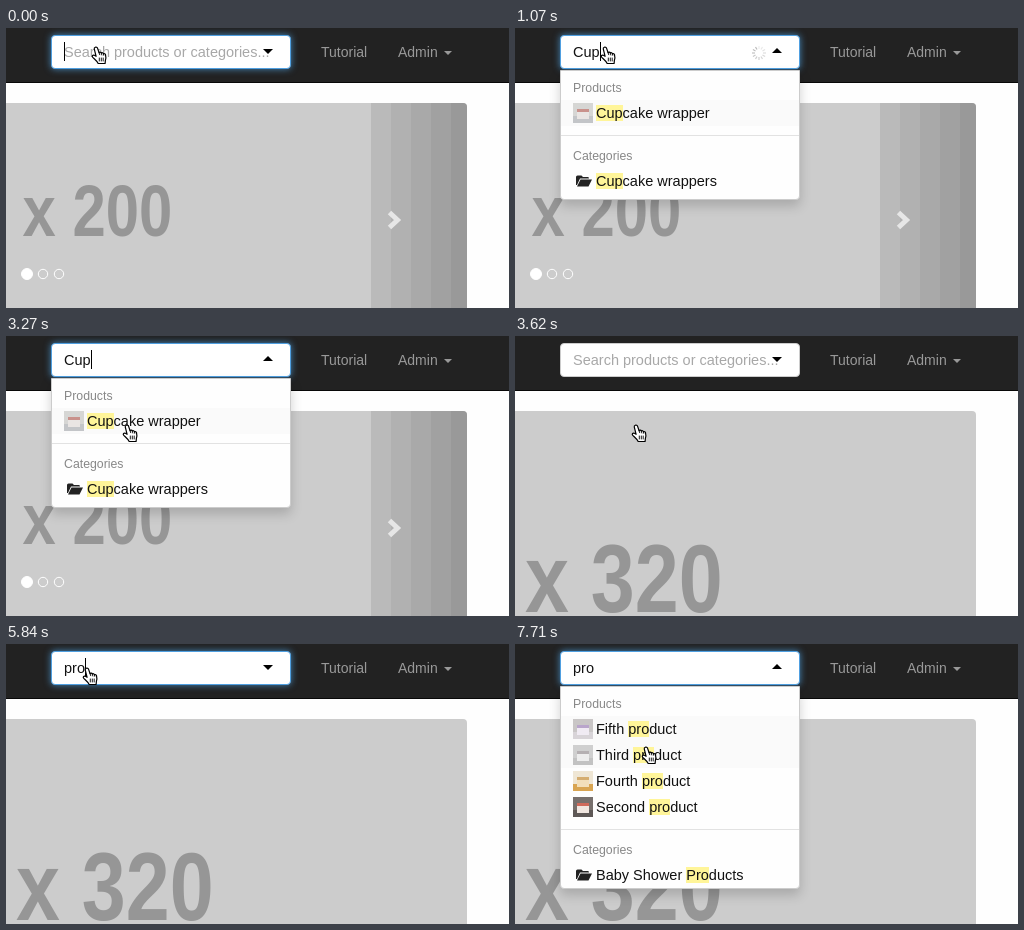
Animation of 503x280 px, one loop 8 s. Source, as an HTML page:

```html
<!DOCTYPE html>
<html lang="en">
<head>
<meta charset="utf-8">
<title>Product search</title>
<style>
  html, body { margin: 0; width: 100%; height: 100%; overflow: hidden; background: #fefefe; }
  body { position: relative; font: 14.5px/26px "Liberation Sans", Arial, sans-serif; color: #111; }
  body * { position: absolute; left: 0; top: 0; box-sizing: border-box; white-space: nowrap; }
  svg { overflow: visible; }
  svg * { position: static; }
  .stage { width: 503px; height: 280px; overflow: hidden; }
  .nav { width: 503px; height: 55px; background: #222; border-bottom: 1px solid #080808; }
  .link { top: 11px; font-size: 14px; color: #999; }
  .search { left: 45px; top: 7px; width: 240px; height: 34px; background: #fff; border: 1px solid #ccc; border-radius: 4px; }
  .search.focus { border-color: #4f9fe0; box-shadow: 0 0 7px rgba(82, 168, 236, .75); }
  #query { left: 58px; top: 11px; }
  #query.empty { color: #a8a8a8; }
  #caret { top: 14px; width: 1px; height: 19px; background: #000; }
  .menu { left: 45px; top: 42px; width: 240px; background: #fefefe; border: 1px solid #ccc; border-radius: 0 0 4px 4px;
          box-shadow: 0 6px 12px rgba(0, 0, 0, .175); overflow: hidden; }
  .head { left: 12px; font-size: 12.3px; color: #888; }
  .row { width: 238px; height: 26px; padding-left: 35px; }
  .row.active { background: #fafafa; }
  .row mark { position: static; background: #fff599; color: inherit; }
  .row svg { left: 12px; top: 3px; }
  .rule { width: 238px; height: 1px; background: #e2e2e2; }
  .lettering { font: bold 73px "Liberation Sans", Arial, sans-serif; fill: #969696; }
</style>
</head>
<body>
<div class="stage">
  <svg width="503" height="280">
    <rect x="-10" y="75" width="471" height="230" rx="4" fill="#ccc"/>
    <g id="slide1">
      <g id="bands"></g>
      <text class="lettering" transform="translate(16.500 208) scale(.82 1)">x 200</text>
      <path d="M383.500 184.500l8 7.500-8 7.500" fill="none" stroke="#e6e6e6" stroke-width="5"/>
      <g fill="none" stroke="#fff">
        <circle cx="21" cy="246" r="5.500" fill="#fff"/>
        <circle cx="37" cy="246" r="4.700"/>
        <circle cx="53" cy="246" r="4.700"/>
      </g>
    </g>
    <text id="slide2" class="lettering" transform="translate(10 276) scale(1.082 1.320)">x 320</text>
  </svg>

  <div class="nav"></div>
  <span class="link" style="left:315px">Tutorial</span>
  <span class="link" style="left:392px">Admin</span>
  <div class="search" id="search"></div>
  <span id="query"></span>
  <div id="caret"></div>
  <svg width="503" height="55">
    <path d="M438 23h8l-4 4z" fill="#999"/>
    <path id="arrow"/>
    <g id="spinner" stroke="#888" stroke-width="1.200"></g>
  </svg>
  <div id="menus"></div>
  <svg id="hand" width="16" height="19" stroke="#000" stroke-linejoin="round" stroke-linecap="round">
    <path fill="#fff" stroke-width="1.200" d="M4.200 1.300c1-.6 2 0 2.400 1.100l1.500 4.300c.6-.8 1.800-.7 2.200.3.700-.6 1.800-.3 2.100.7.900-.4 1.900.1 2.100 1 .5 2 .6 3.600-.1 5.500l-.3 3.300H7.200C6.300 15.200 3.700 13.300 1.600 11.200c-1-1.200.4-2.700 1.800-1.900l1.700 1L3.300 3.200C3.100 2.400 3.500 1.600 4.200 1.300z"/>
    <path fill="none" stroke-width=".9" d="M8.100 6.700l.6 2M10.300 7l.5 2M12.400 7.700l.3 1.600M8.300 12v3M10.300 12v3M12.200 12v3"/>
  </svg>
</div>

<script>
const LOOP = 8000;
const $ = id => document.getElementById(id);
const rect = (x, y, w, h, fill) => `<rect x="${x}" y="${y}" width="${w}" height="${h}" fill="${fill}"/>`;

$("bands").innerHTML = ["#bababa", "#b1b1b1", "#a9a9a9", "#a1a1a1"]
  .map((fill, i) => rect(365 + 20 * i, 75, 21, 205, fill)).join("") +
  '<path d="M445 75h12q4 0 4 4v201h-16z" fill="#999"/>';

$("spinner").innerHTML = Array.from({ length: 12 }, (_, i) =>
  `<path d="M244 21v-3" opacity="${0.15 + i * 0.04}" transform="rotate(${i * 30} 244 25)"/>`).join("");

// Thumbnail: backdrop, table, item and its trim.
const thumb = (back, table, item, trim) => `<svg width="20" height="20">${
  rect(0, 0, 20, 20, back) + rect(0, 13, 20, 7, table) + rect(4, 7, 12, 9, item) + rect(4, 6, 12, 3, trim)}</svg>`;
const folder = `<svg width="20" height="20"><path fill="#222" d="M3 14V6q0-1.500 1.500-1.500h4L10 6h5q1 0 1 1.500H7L4 14z"/>
  <path fill="#222" d="M7.500 8.500H19L15.500 15.500H4z"/></svg>`;

const row = (y, icon, label, active) =>
  `<div class="row${active ? " active" : ""}" style="top:${y}px">${icon}${label.replace(/\[(.*)\]/, "<mark>$1</mark>")}</div>`;

function addMenu(products, category, height) {
  const end = 29 + 26 * products.length;
  const menu = document.createElement("div");
  menu.className = "menu";
  menu.style.height = height + "px";
  menu.innerHTML = '<div class="head" style="top:4px">Products</div>' +
    products.map(([label, ...colors], i) => row(29 + 26 * i, thumb(...colors), label, i === 0)).join("") +
    `<div class="rule" style="top:${end + 9}px"></div>
     <div class="head" style="top:${end + 17}px">Categories</div>` +
    row(end + 42, folder, category);
  $("menus").append(menu);
  return menu;
}

const cupMenu = addMenu([["[Cup]cake wrapper", "#d6d6d4", "#c3c5c8", "#e9e5e3", "#c9928c"]], "[Cup]cake wrappers", 130);
const proMenu = addMenu([
  ["Fifth [pro]duct", "#c9c6c6", "#d8d4d8", "#f0ebf3", "#b9a5cb"],
  ["Third [pro]duct", "#cfcfcf", "#c2c2c2", "#ededed", "#b5b0b2"],
  ["Fourth [pro]duct", "#efe6d4", "#d9a552", "#f3dfba", "#d5ad70"],
  ["Second [pro]duct", "#77706d", "#5e5856", "#f0e6e0", "#cf6a5b"],
], "Baby Shower [Pro]ducts", 203);
const secondRow = proMenu.querySelectorAll(".row")[1];

const typing = [[0, ""], [270, "C"], [450, "Cu"], [620, "Cup"], [3350, "Cupcake wrapper"], [3620, ""],
  [5580, "p"], [5670, "pr"], [5840, "pro"]];
const caretOn = [[0, 1510], [2020, 2560], [3100, 3350], [4680, 5220], [5580, 6730], [7270, 7710]];

// Pointer moves: start, end, steps, destination.
const moves = [[1420, 2020, 8, 121, 87], [2380, 2740, 5, 121, 146], [2820, 3180, 5, 116, 88],
  [4160, 4510, 5, 76, 23], [7180, 7710, 7, 126, 102]];

const within = (t, from, to) => t >= from && t < to;
const show = (el, on) => { el.style.display = on ? "" : "none"; };

function pointerAt(t) {
  let x = 85, y = 18;
  for (const [start, end, steps, toX, toY] of moves) {
    if (t < start) break;
    const step = Math.floor((t - start) / (end - start) * (steps - 1) + 1e-6) + 1;
    const p = Math.min(1, step / steps);
    const eased = p * p * (3 - 2 * p);
    x += (toX - x) * eased;
    y += (toY - y) * eased;
  }
  return [Math.round(x), Math.round(y)];
}

function draw(t) {
  const text = typing.findLast(([at]) => t >= at)[1];
  const cupOpen = within(t, 1070, 3350), proOpen = t >= 6290;
  const query = $("query");

  show($("slide1"), t < 3620);
  show($("slide2"), t >= 3620);
  $("search").classList.toggle("focus", !within(t, 3620, 4680));

  query.textContent = text || "Search products or categories...";
  query.classList.toggle("empty", !text);
  $("caret").style.left = 58 + (text ? Math.round(query.getBoundingClientRect().width) : 0) + "px";
  show($("caret"), caretOn.some(([from, to]) => within(t, from, to)));

  $("arrow").setAttribute("d", cupOpen || proOpen ? "M257 25h10l-5-5z" : "M257 21h10l-5 5z");
  show($("spinner"), within(t, 1070, 1160) || within(t, 6290, 6380));
  show(cupMenu, cupOpen);
  show(proMenu, proOpen);
  secondRow.classList.toggle("active", t >= 7620);

  const [x, y] = pointerAt(t);
  $("hand").style.transform = `translate(${x}px, ${y}px)`;
}

function frame() {
  draw(performance.now() % LOOP);
  requestAnimationFrame(frame);
}
frame();
</script>
</body>
</html>
```
